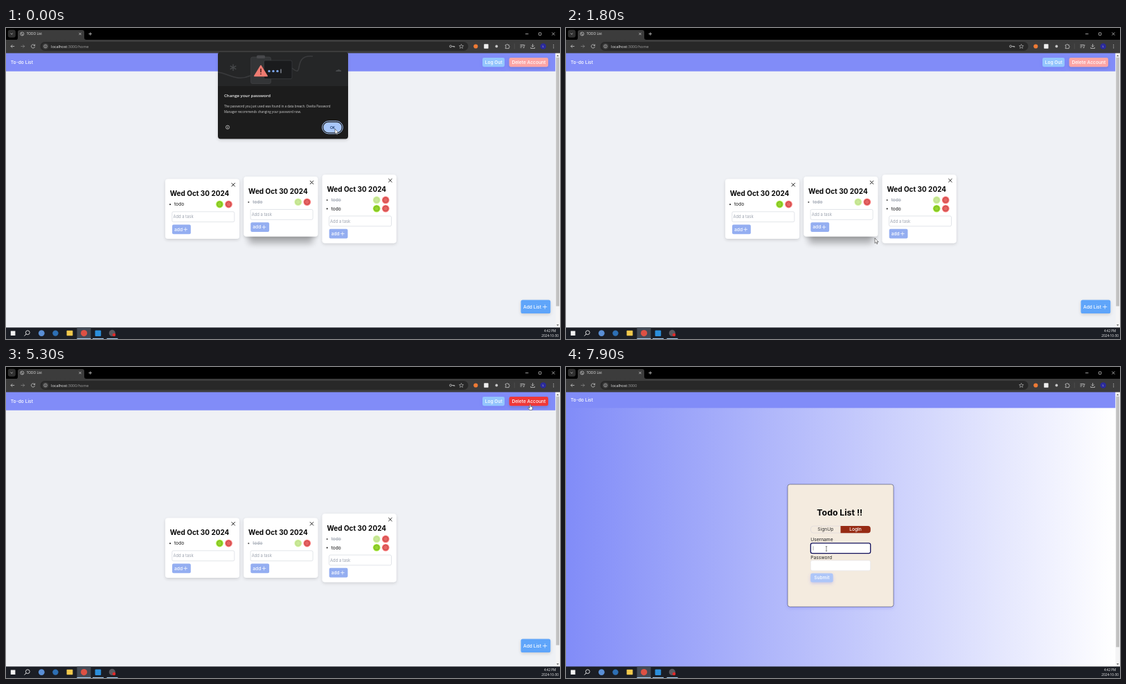
Recreate the animation shown at these times as an HTML page. Size 800 px wide and 450 px high, loop 8 s.

```html
<!DOCTYPE html>
<html lang="en">
<head>
<meta charset="utf-8">
<title>To-do List</title>
<style>
  html, body { margin: 0; width: 100%; height: 100%; overflow: hidden; background: #000; }
  svg { display: block; width: 100vw; height: 100vh; }
  text { font-family: Inter, sans-serif; font-size: 6.67px; white-space: pre; }
  .ui { font-family: "Open Sans", "Noto Sans", sans-serif; }
  .line { fill: none; stroke: #c7c7c7; stroke-width: .8; }
</style>
</head>
<body>
<svg id="stage" viewBox="0 0 800 450" xmlns="http://www.w3.org/2000/svg"></svg>
<script>
const LOOP = 8000, STEP = 100;
const INDIGO = '#818cf8';

// Markup helpers
const rect = (x, y, w, h, fill, r = 0, more = '') =>
  `<rect x="${x}" y="${y}" width="${w}" height="${h}" fill="${fill}" rx="${r}" ${more}/>`;
const circle = (x, y, r, fill, more = '') =>
  `<circle cx="${x}" cy="${y}" r="${r}" fill="${fill}" ${more}/>`;
const path = (d, more = 'class="line"') => `<path d="${d}" ${more}/>`;
const text = (x, y, s, fill, more = '') => `<text x="${x}" y="${y}" fill="${fill}" ${more}>${s}</text>`;
const ui = (x, y, s, size, fill, more = '') =>
  text(x, y, s, fill, `class="ui" style="font-size:${size}px" ${more}`);
const group = (id, body, more = '') => `<g id="${id}" ${more}>${body}</g>`;
const plus = (x, y, r, more) => path(`M${x - r} ${y}h${2 * r}M${x} ${y - r}v${2 * r}`, more);
const cross = (x, y, r, more) =>
  path(`M${x - r} ${y - r}l${2 * r} ${2 * r}m0 ${-2 * r}l${-2 * r} ${2 * r}`, more);
const white = 'fill="none" stroke="#fff" stroke-width=".7"';
const medium = 'font-weight="500"';
const middle = 'text-anchor="middle"';

// Home page
function face(x, y, fill, ink, opacity) {
  return `<g opacity="${opacity}">${circle(x, y, 5.3, fill)}
    ${circle(x, y, 3.4, 'none', `stroke="${ink}" stroke-width=".6"`)}
    ${circle(x, y, 1.5, 'none', `stroke="${ink}" stroke-width=".5" opacity=".6"`)}</g>`;
}

function card(id, x, tasks) {
  const h = 74.2 + tasks.length * 12.4, top = 261.7 - h / 2;
  const items = tasks.map((done, i) => {
    const y = top + 36.7 + i * 12.4, ink = done ? '#9ca3af' : '#111';
    return circle(x + 7, y + .2, 1, done ? '#444' : '#111') +
      text(x + 13, y + 2.2, 'todo', ink, done ? 'text-decoration="line-through"' : '') +
      face(x + 78.5, y, '#a3e635', '#4d7c0f', done ? .5 : 1) +
      face(x + 91.5, y, '#f87171', '#8b1d1d', 1);
  }).join('');
  const y = top + tasks.length * 12.4;
  return group(id,
    rect(x + 7, top + 22, 93, h - 12, '#000', 4, 'class="lift" filter="url(#blur)" opacity="0"') +
    rect(x, top, 107, h, '#fff', 4, 'filter="url(#soft)"') +
    cross(x + 98.2, top + 8.4, 2.6, 'fill="none" stroke="#111" stroke-width=".9"') +
    text(x + 6.7, top + 25, 'Wed Oct 30 2024', '#050505', 'font-weight="700" style="font-size:10px"') +
    items +
    rect(x + 9.8, y + 35, 90, 14.8, '#fff', 2, 'stroke="#cfd3da" stroke-width=".6"') +
    text(x + 11.4, y + 44.6, 'Add a task', '#9ca3af', 'style="font-size:5.83px"') +
    rect(x + 10, y + 53.7, 26.8, 13.7, '#94aef1', 2) +
    text(x + 13, y + 62.9, 'add', '#fff', medium) +
    plus(x + 29.2, y + 60.6, 2.8, white));
}

const slots = [230, 343.3, 456.7];
const fullCards = [[0], [1], [1, 0]].map((tasks, i) => card('card' + i, slots[i], tasks)).join('');
const emptyCards = slots.map((x, i) => card('bare' + i, x, [])).join('');

const home = group('home',
  rect(0, 36, 794, 398, '#eff1f5') +
  group('full', fullCards) + group('empty', emptyCards) +
  rect(743.5, 393.6, 42.8, 19.4, '#5fa5fa', 2.6, 'filter="url(#soft)"') +
  text(747, 405.8, 'Add List', '#fff', medium) + plus(778.2, 403.5, 3.1, white));

// Login page
const field = (id, y) => rect(353.3, y, 86.4, 14.8, '#fff', 2.4, `id="${id}" stroke="#dcdfe6" stroke-width=".5"`);
const login = group('login',
  rect(0, 36, 794, 398, 'url(#fade)') +
  group('form',
    rect(320, 173.3, 153, 177.2, '#f4ebdf', 3.4, 'stroke="#3f4660" stroke-width=".6" filter="url(#glow)"') +
    text(395.3, 218.8, 'Todo List !!', '#050505', `${middle} font-weight="700" style="font-size:12.3px"`) +
    rect(353.4, 233.6, 86.2, 10, 'none', 4, 'stroke="#d9d6da" stroke-width=".6"') +
    path('M396.5 233.4H436a3.8 3.8 0 0 1 3.8 3.8V240a3.8 3.8 0 0 1 -3.8 3.8H396.5Z', 'fill="#972b14"') +
    text(374.8, 240.9, 'SignUp', '#333', middle) +
    text(418, 240.9, 'LogIn', '#fff', `${middle} ${medium}`) +
    text(353.2, 255.8, 'Username', '#222') + field('user', 258.4) +
    text(353.2, 281, 'Password', '#222') + field('pass', 283.4) +
    path('M357 262.8v6', 'id="caret" stroke="#555" stroke-width=".5"') +
    rect(353.2, 301.9, 32.4, 13.2, '#aec6f8', 2.4, 'filter="url(#glow)"') +
    text(369.3, 310.8, 'Submit', '#fff', `${middle} ${medium}`)));

// Page header and scrollbar
const header =
  rect(0, 36, 793.5, 26.7, INDIGO, 0, 'id="bar"') +
  text(6.8, 52.1, 'To-do List', '#fff', `id="brand" ${medium}`) +
  group('account',
    rect(688, 43, 32, 13.2, '#93c5fd', 2.4, 'filter="url(#glow)"') +
    text(704.2, 52, 'Log Out', '#fff', `${middle} ${medium}`) +
    rect(726.6, 43, 56.4, 13.2, '#fca5a5', 2.4, 'id="del" filter="url(#soft)"') +
    text(754.8, 52, 'Delete Account', '#fff', `${middle} ${medium}`)) +
  rect(793.5, 36, 6.5, 398, '#f4f4f5') +
  rect(794.3, 42.5, 4.7, 360, '#c1c1c1', 0, 'id="thumb"') +
  path('M795 41l1.7-2 1.7 2zM795 429l1.7 2 1.7-2z', 'fill="#606060"');

// Browser frame
const browser =
  rect(0, 0, 800, 18, '#000') + rect(0, 17, 800, 19.4, '#3c3c3c') +
  rect(2.8, 2.8, 11, 11, '#303030', 3) + path('M6.6 7.6l1.6 1.6 1.6-1.6') +
  path('M14 17.2q3 0 3-3V6q0-3 3-3H110q3 0 3 3v8q0 3 3 3z', 'fill="#3c3c3c"') +
  group('globe', circle(23.3, 8.5, 2.5, 'none', 'stroke="#d5d5d5" stroke-width=".7"') +
    path('M21.3 7.3l2.4 1.4.2 2')) +
  path('M23.3 6a2.5 2.5 0 1 1 -2.5 2.5', 'id="spin" class="line"') +
  ui(29.8, 10.2, 'TODO List', 4.75, '#e6e6e6', 'id="tab"') +
  cross(107, 8.5, 1.6) + plus(121.7, 8.5, 2.3) +
  path('M750 8.6h4.4') + rect(769.3, 6.8, 3.6, 3.6, 'none', .6, 'stroke="#ddd" stroke-width=".7"') +
  cross(790.4, 8.5, 2) +
  path('M12.2 26.5H7m2.3-2.3L7 26.5l2.3 2.3') +
  path('M21.5 26.5h5.2m-2.3-2.3l2.3 2.3-2.3 2.3', 'class="line" opacity=".5"') +
  group('reload', path('M41.4 25.3a2.6 2.6 0 1 0 .2 1.8M41.7 23.6v2h-2')) +
  group('stop', cross(39.2, 26.5, 2)) +
  rect(49.5, 20, 618, 13, '#282828', 6.5) +
  circle(57, 26.5, 4.6, '#3c3c3c') + circle(57, 26.5, 2.3, 'none', 'stroke="#ccc" stroke-width=".6"') +
  path('M57 26v1.8M57 24.9v.6', 'stroke="#ccc" stroke-width=".6"') +
  ui(65, 28.5, 'localhost<tspan fill="#a0a0a0" id="path">:3000/home</tspan>', 5.55, '#f0f0f0') +
  group('key', circle(642, 26.5, 1.5, 'none', 'class="line"') + path('M643.5 26.5h4.2v1.6m-1.6-1.6v1.4')) +
  path('M657.5 23.5l.9 2 2.2.2-1.7 1.5.5 2.2-1.9-1.2-1.9 1.2.5-2.2-1.7-1.5 2.2-.2z', 'class="line" style="stroke-width:.6"') +
  circle(678.3, 26.5, 3.1, '#ee7a35') + rect(690.2, 23.3, 6.4, 6.4, '#eee', .6) +
  circle(708.4, 26.5, 1.9, '#c7c7c7') +
  path('M721.2 24.5h1.5a1 1 0 0 1 2 0h1.5v1.6a1 1 0 0 1 0 2v1.5h-5v-1.4a1 1 0 0 0 0-2z') +
  path('M734.2 22.5v8', 'stroke="#5c5c5c" stroke-width=".6"') +
  path('M742.5 24.4h5.4m-5.4 1.9h3.6m-3.6 1.9h2.2M748 24.6v4h-1.3M748 25h1.6') +
  path('M760.6 23v4.2m-1.9-1.8l1.9 1.9 1.9-1.9M757.8 27.8v1.7h5.6v-1.7') +
  circle(775.7, 26.5, 4.3, '#2a2a9c') + ui(775.7, 28, 'L', 4.2, '#ddd', middle) +
  [24.3, 26.5, 28.7].map(y => circle(790.7, y, .6, '#d0d0d0')).join('');

// Password notice
const notice = group('notice',
  rect(306, 35, 188, 125.4, '#1f1f1f', 4, 'filter="url(#soft)"') +
  path('M306 84V39q0-4 4-4H490q4 0 4 4V84z', 'fill="#252627"') +
  path('M306 64C322 66 332 78 353 69M413 58C432 74 412 38 443 41', 'fill="none" stroke="#3a3b3d" stroke-width="1.6"') +
  path('M328 52.5v9.6m-4.3-7.2l8.6 4.8m0-4.8l-8.6 4.8', 'stroke="#46484a" stroke-width="1.4"') +
  path('M476 63q1-3 3-2 1-2.6 3-.2 2-.4 2.2 2.2z', 'fill="#46484a"') +
  rect(353.5, 42, 29, 38.5, '#333537', 2.5, 'stroke="#48494c" stroke-width=".5"') +
  rect(362, 39.6, 12, 4.4, '#48494c', 1.5) +
  rect(372.5, 47, 40.5, 26.5, '#1a1b1d', 2, 'stroke="#3c3e41" stroke-width=".7"') +
  [380, 386, 392].map(x => circle(x, 62.4, 1.7, '#7ca6ee')).join('') +
  path('M397 59.5v5.8', 'stroke="#d8e2f5" stroke-width=".8"') +
  path('M368 54.5l9.2 15H358.8z', 'fill="#ee7b72" stroke="#ee7b72" stroke-width="1.5" stroke-linejoin="round"') +
  path('M368 58.8v5.4m0 1.5v1.6', 'stroke="#331312" stroke-width="1.4"') +
  ui(315, 99.7, 'Change your password', 6.1, '#f0f0f0', 'font-weight="600"') +
  ui(315, 115, 'The password you just used was found in a data breach. Ovelta Password', 4.5, '#d2d2d2') +
  ui(315, 123.2, 'Manager recommends changing your password now.', 4.5, '#d2d2d2') +
  circle(320, 143.6, 2.6, 'none', 'class="line"') + path('M320 143v2.2m0-3.5v.7') +
  rect(456.6, 134.7, 29.8, 18.2, '#1f1f1f', 9.1, 'stroke="#a8c7fa" stroke-width="1"') +
  rect(458.3, 136.4, 26.4, 14.8, '#a8c7fa', 7.4) +
  ui(471.5, 145.6, 'OK', 5, '#12305f', `${middle} font-weight="600"`));

// Taskbar
const taskbar =
  rect(0, 433.4, 800, 17, '#1b1e25') +
  rect(102.5, 433.4, 20, 17, '#434a55') +
  rect(6.8, 438.4, 6.6, 6.6, '#f2f2f2') +
  circle(31.3, 440.7, 2.9, 'none', 'stroke="#eee" stroke-width=".9"') +
  path('M29.2 442.9l-2.7 2.7', 'stroke="#eee" stroke-width="1"') +
  circle(51.3, 441.6, 4.4, '#5a8fd6') + circle(71.4, 441.6, 4.2, '#2d6fb4') +
  rect(87.6, 437.8, 8.8, 7.4, '#f2c94c', .6) +
  circle(112.6, 441.6, 4.6, '#dd5144') + rect(128.6, 437.4, 8.6, 8.6, '#2b8fdc', 1) +
  circle(153.3, 441.4, 4.6, '#5b5b61') + circle(156, 444, 2.3, '#e02b2b') +
  [[102.5, 20], [125, 16], [145.5, 16]].map(([x, w]) => rect(x, 448.9, w, 1.1, '#a9cdee')).join('') +
  ui(785.6, 439.7, '4:42 PM', 4.6, '#f2f2f2', middle) +
  ui(785.6, 447.3, '2024-10-30', 4.7, '#f2f2f2', middle);

const pointers =
  path('M0 0V7.4L1.7 5.9 2.9 8.5 4 8 2.9 5.5H5.2Z', 'id="arrow" fill="#fff" stroke="#222" stroke-width=".55"') +
  path('M-.8 .6Q0-.4.8.6V3.2L3 3.8Q3.7 4 3.5 5L2.8 8.2H-1L-3 5.5Q-2.9 4.4-1.8 5L-.8 5.6Z', 'id="hand" fill="#fff" stroke="#222" stroke-width=".5"') +
  path('M-1.2-3.3H1.2M0-3.3V3.3M-1.2 3.3H1.2', 'id="beam" fill="none" stroke="#333" stroke-width=".6"');

const shadow = (id, dy, sd, color, opacity) =>
  `<filter id="${id}" x="-30%" y="-30%" width="160%" height="180%">
    <feDropShadow dx="0" dy="${dy}" stdDeviation="${sd}" flood-color="${color}" flood-opacity="${opacity}"/></filter>`;

const stage = document.getElementById('stage');
stage.innerHTML = `<defs>
  <linearGradient id="fade"><stop stop-color="${INDIGO}"/><stop offset="1" stop-color="#fff"/></linearGradient>
  <filter id="blur" x="-30%" y="-30%" width="160%" height="160%"><feGaussianBlur stdDeviation="5"/></filter>
  ${shadow('soft', 1.8, 2, '#000', .14)}${shadow('glow', 1.8, 2, '#6366f1', .28)}</defs>` +
  home + login + header + browser + notice + taskbar + group('cursor', pointers);

const el = {};
stage.querySelectorAll('[id]').forEach(node => { el[node.id] = node; });
const lift = el.card1.querySelector('.lift');

// Pointer route: time, x, y
const route = [
  [0, 475, 146], [200, 475, 146], [900, 416, 211], [1000, 415, 210], [1200, 365, 187],
  [1400, 321, 200], [1800, 446, 304], [1950, 470, 312], [2150, 560, 314], [2300, 586, 290],
  [2500, 586, 290], [3000, 621, 206], [3400, 612, 152], [4300, 703, 108], [5000, 757, 54],
  [5300, 757, 54], [5900, 751, 49], [6800, 751, 49], [6900, 734, 57], [7600, 326, 338],
  [7900, 376, 263], [8000, 376, 263]
];

function pointerAt(t) {
  const i = Math.max(1, route.findIndex(p => p[0] >= t));
  const [t0, x0, y0] = route[i - 1], [t1, x1, y1] = route[i];
  const k = (t - t0) / (t1 - t0);
  return [x0 + (x1 - x0) * k, y0 + (y1 - y0) * k];
}

const ease = (t, start, span) => {
  const k = Math.min(1, Math.max(0, (t - start) / span));
  return k * k * (3 - 2 * k);
};
const show = (name, on) => el[name].setAttribute('display', on ? 'inline' : 'none');
const within = (x, y, l, t, r, b) => x >= l && x <= r && y >= t && y <= b;
const mix = (a, b, k) => `rgb(${a.map((v, i) => Math.round(v + (b[i] - v) * k))})`;

function draw(t) {
  const onLogin = t >= 6900, cleared = t >= 6800, loading = t >= 6800 && t < 7100;
  const signedOut = t >= 7100, focused = t >= 7900;

  show('home', !onLogin);
  show('login', onLogin);
  show('full', !cleared);
  show('empty', cleared);
  show('notice', t < 200);

  const raise = 1 - ease(t, 200, 300) + ease(t, 1400, 200) - ease(t, 1800, 200);
  el.card1.setAttribute('transform', `translate(0 ${-3.3 * raise})`);
  lift.setAttribute('opacity', .28 * raise);

  const hot = onLogin ? 0 : ease(t, 4800, 200);
  el.del.setAttribute('fill', mix([252, 165, 165], [239, 56, 56], hot));

  show('account', !signedOut);
  el.bar.setAttribute('height', signedOut ? 23.3 : 26.7);
  el.brand.setAttribute('y', signedOut ? 50.4 : 52.1);
  el.thumb.setAttribute('height', signedOut ? 362.8 : 360);
  el.form.setAttribute('transform', `translate(0 ${signedOut ? -3.5 : 0})`);
  el.user.setAttribute('stroke', focused ? '#10105c' : '#dcdfe6');
  el.user.setAttribute('stroke-width', focused ? 1.3 : .5);
  show('caret', focused);

  show('globe', !loading);
  show('spin', loading && onLogin);
  show('stop', loading);
  show('reload', !loading);
  show('key', !onLogin);
  el.tab.textContent = loading && onLogin ? 'localhost:3000' : 'TODO List';
  el.path.textContent = onLogin ? ':3000' : ':3000/home';

  const [x, y] = pointerAt(t);
  const hand = !onLogin && within(x, y, 726, 43, 783, 57);
  const beam = onLogin && (within(x, y, 353, 255, 440, 270) || within(x, y, 353, 280, 440, 295));
  show('hand', hand);
  show('beam', beam);
  show('arrow', !hand && !beam);
  el.cursor.setAttribute('transform', `translate(${x} ${y})`);
}

function tick(now) {
  draw(Math.floor(now % LOOP / STEP) * STEP);
  requestAnimationFrame(tick);
}
draw(0);
requestAnimationFrame(tick);
</script>
</body>
</html>
```
